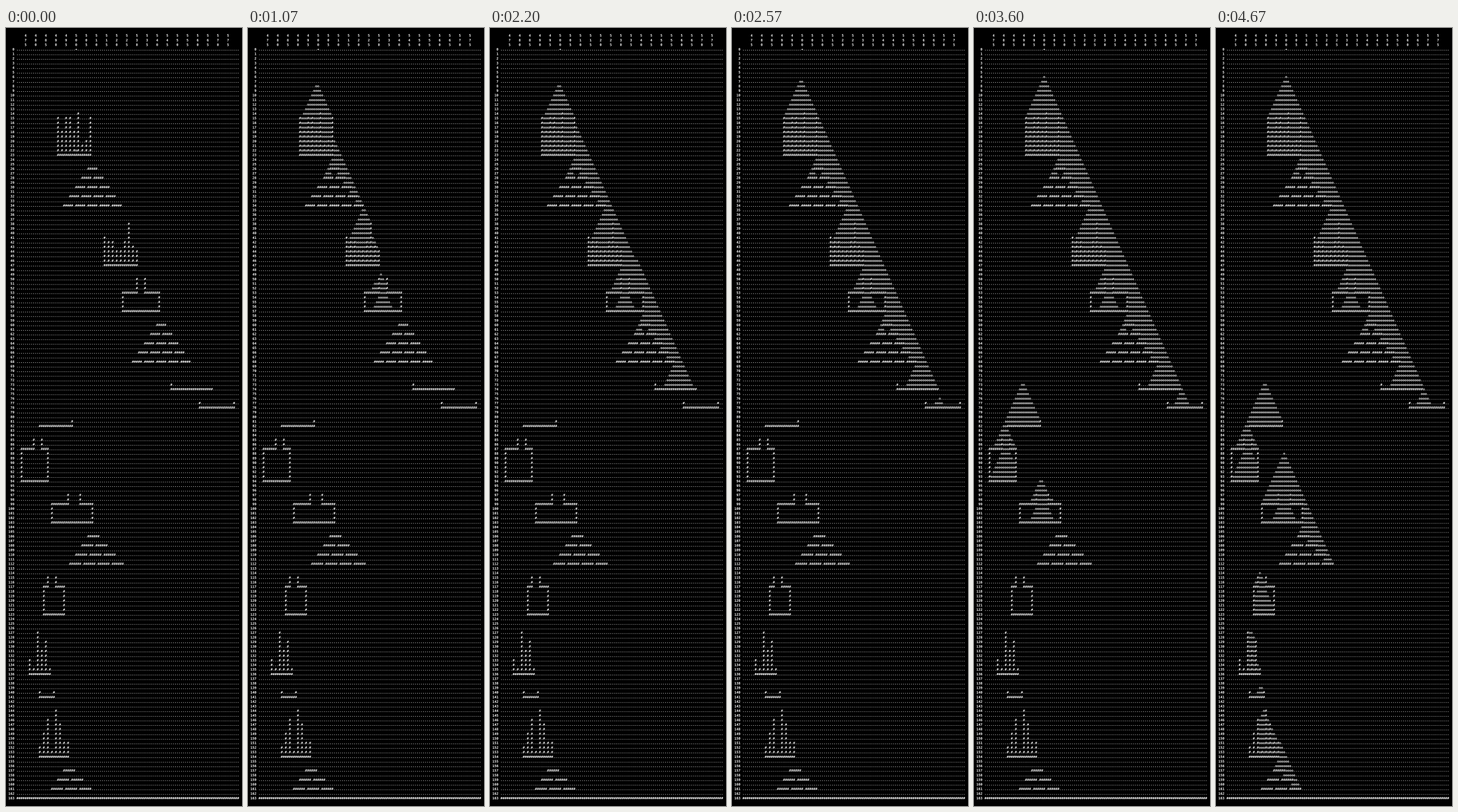
These frames come from a looping animation (388 px wide and 1280 px high, 4710 ms). An HTML page with a canvas:

```html
<!DOCTYPE html>
<html lang="en">
<head>
<meta charset="utf-8">
<title>Falling sand</title>
<style>
html, body { margin: 0; width: 100%; height: 100%; overflow: hidden; background: #000; }
canvas { display: block; }
</style>
</head>
<body>
<canvas id="view" width="388" height="1280"></canvas>
<script>
const LOOP = 4710, LAST_STEP = 140, GRAINS_PER_STEP = 10;
const LEFT = 471, RIGHT = 580, FLOOR = 163, SOURCE = 500;
const CELL_W = 3.328, CELL_H = 7.558, SCALE = 4;

// --- Cave ---
const rocks = new Set();
const key = (x, y) => y * 1000 + x;

function line(x1, y1, x2, y2) {
  for (let y = y1; y <= y2; y++)
    for (let x = x1; x <= x2; x++) rocks.add(key(x, y));
}

// Floor with a tooth on every second column.
function comb(x, y, heights) {
  line(x, y, x + 2 * (heights.length - 1), y);
  heights.forEach((h, i) => line(x + 2 * i, y - h, x + 2 * i, y));
}

// Rows of short ledges, one more ledge in each row.
function ledges(x, y, rows, width) {
  for (let r = 0; r < rows; r++)
    for (let i = 0; i <= r; i++) {
      const start = x - 3 * r + i * (width + 1);
      line(start, y + 2 * r, start + width - 1, y + 2 * r);
    }
}

// Closed box with a narrow neck between columns a and b.
function jar(left, a, b, right, top, shoulder, bottom) {
  line(a, top, a, shoulder);
  line(b, top, b, shoulder);
  line(left, shoulder, a, shoulder);
  line(b, shoulder, right, shoulder);
  line(left, shoulder, left, bottom);
  line(right, shoulder, right, bottom);
  line(left, bottom, right, bottom);
}

function tray(left, right, y, ...lips) {
  line(left, y, right, y);
  lips.forEach(x => line(x, y - 1, x, y));
}

comb(491, 23, [8, 5, 8, 8, 5, 9, 2, 3, 8]);
ledges(506, 26, 5, 5);
comb(514, 47, [6, 5, 5, 3, 3, 5, 9, 4, 3]);
jar(523, 530, 534, 541, 50, 53, 57);
ledges(540, 60, 5, 5);
tray(547, 567, 74, 547);
tray(561, 578, 78, 561, 578);
tray(482, 498, 82, 498);
jar(473, 479, 483, 486, 85, 87, 94);
jar(488, 496, 502, 508, 97, 99, 103);
ledges(506, 106, 4, 6);
jar(484, 486, 490, 494, 115, 117, 123);
comb(477, 136, [3, 1, 9, 5, 7, 1]);
tray(482, 489, 141, 482, 489);
comb(482, 154, [2, 5, 8, 1, 10, 7, 3, 3]);
ledges(494, 157, 3, 6);
line(LEFT, FLOOR, RIGHT, FLOOR);

// --- Sand: resting places in order of arrival ---
function pour(limit) {
  const filled = new Set(rocks), grains = [];
  while (grains.length < limit) {
    let x = SOURCE, y = 0;
    while (y < FLOOR - 1) {
      const next = [x, x - 1, x + 1].find(c => !filled.has(key(c, y + 1)));
      if (next === undefined) break;
      x = next;
      y++;
    }
    if (y >= FLOOR - 1 || y === 0) break;
    filled.add(key(x, y));
    grains.push([x, y]);
  }
  return grains;
}
const grains = pour(LAST_STEP * GRAINS_PER_STEP + 1);

// --- Drawing ---
const view = document.getElementById('view');
const ctx = view.getContext('2d');

function layer(scale) {
  const canvas = document.createElement('canvas');
  canvas.width = view.width * scale;
  canvas.height = view.height * scale;
  return canvas;
}

function cell(x, y) {
  const px = 115.4 + (x - SOURCE) * CELL_W, py = 37 + y * CELL_H;
  return [px - CELL_W / 2, py - 5.5, CELL_W, CELL_H];
}

function put(g, ch, x, y) {
  const [left, top, w, h] = cell(x, y);
  g.fillStyle = '#000';
  g.fillRect(left, top, w, h);
  g.fillStyle = '#fff';
  g.fillText(ch, left + w / 2, top + 5.5);
}

// The large drawing is reduced so that glyphs keep fractional positions.
function reduce(large) {
  const small = layer(1), g = small.getContext('2d');
  g.imageSmoothingQuality = 'high';
  g.drawImage(large, 0, 0, small.width, small.height);
  return small;
}

const large = layer(SCALE), pen = large.getContext('2d');
pen.fillRect(0, 0, large.width, large.height);
pen.scale(SCALE, SCALE);
pen.font = 'bold 5.53px "DejaVu Sans Mono", monospace';
pen.textAlign = 'center';
pen.textRendering = 'geometricPrecision';

for (let x = 475; x <= 575; x += 5)
  [...String(x)].forEach((d, i) => put(pen, d, x, i - 3));
for (let y = 0; y <= FLOOR; y++) {
  [...String(y).padStart(3)].forEach((d, i) => put(pen, d, LEFT - 4 + i, y));
  for (let x = LEFT; x <= RIGHT; x++)
    put(pen, rocks.has(key(x, y)) ? '#' : '.', x, y);
}
put(pen, '+', SOURCE, 0);
const empty = reduce(large);
grains.forEach(([x, y]) => put(pen, 'o', x, y));
const full = reduce(large);

let shown = Infinity;
function draw(now) {
  const t = Math.floor(now % LOOP / 10) * 10;
  const step = Math.min(LAST_STEP, Math.floor((t + 5) * 0.03));
  const count = Math.min(grains.length, step * GRAINS_PER_STEP + 1);
  if (count < shown) {
    ctx.drawImage(empty, 0, 0);
    shown = 0;
  }
  for (; shown < count; shown++) {
    const box = cell(...grains[shown]);
    ctx.drawImage(full, ...box, ...box);
  }
}

let start;
function tick(now) {
  start ??= now;
  draw(Math.max(0, now - start));
  requestAnimationFrame(tick);
}
draw(0);
requestAnimationFrame(tick);
</script>
</body>
</html>
```
